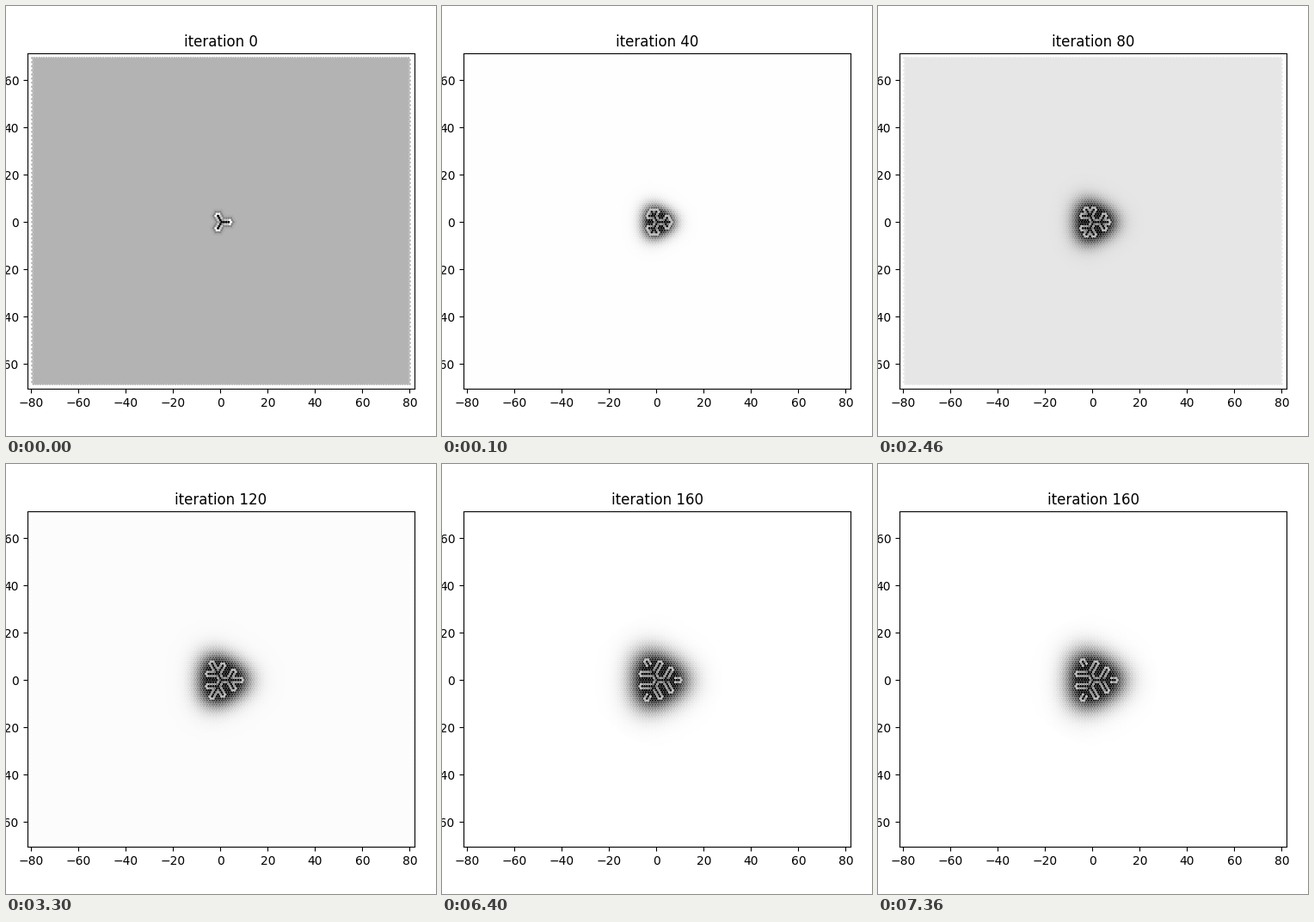
A matplotlib script that plays this animation: 500x500 px, repeating every 8 s.

```python
import numpy as np
import matplotlib.pyplot as plt
from matplotlib.animation import FuncAnimation
from matplotlib.patches import Rectangle

ROW = np.sqrt(3) / 2
CENTER = np.array([0.5, 0.0])

# start tick (100 ms each), iteration, background level, arm length,
# side branch length, arm steps without rim, depletion radius, depletion width
STAGES = [
    (0, 0, 0.700, 3, 0, (), 0, 0),
    (1, 40, 0.993, 5, 2, (), 4.0, 3.3),
    (12, 80, 0.900, 6, 3, (), 5.5, 4.2),
    (33, 120, 0.985, 8, 4, (), 6.5, 5.0),
    (64, 160, 0.997, 9, 5, (5, 6, 7), 7.0, 5.8),
]
BRANCH_AT = 3


def unit(degrees):
    a = np.radians(degrees)
    return np.array([np.cos(a), np.sin(a)])


def lattice():
    row, col = np.meshgrid(np.arange(-79, 81), np.arange(-79, 81), indexing="ij")
    x = col - 0.5 * (row % 2 == 0)
    return np.column_stack([x.ravel(), (row * ROW).ravel()])


def crystal(arm, side, bare):
    """Frozen cells and a mask of those that carry a visible rim."""
    cells, rimmed = [CENTER], [True]
    for angle in (0, 120, 240):
        for step in range(1, arm + 1):
            cells.append(CENTER + step * unit(angle))
            rimmed.append(step not in bare)
        root = CENTER + BRANCH_AT * unit(angle)
        for turn in (-60, 60):
            for step in range(1, side + 1):
                cells.append(root + step * unit(angle + turn))
                rimmed.append(True)
    return np.array(cells), np.array(rimmed)


def vapour(points, level, radius, width):
    dx, dy = (points - CENTER).T
    lobes = 1 - 0.07 * np.cos(3 * np.arctan2(dy, dx))
    depth = np.clip(np.hypot(dx, dy) * lobes - radius, 0, None) / width
    return level * (1 - np.exp(-depth ** 1.5))


def shade(points, stage):
    _, iteration, level, arm, side, bare, radius, width = stage
    cells, rimmed = crystal(arm, side, bare)
    dist = np.linalg.norm(points[:, None] - cells[None], axis=2)
    nearest = dist.min(axis=1)
    contacts = (dist[:, rimmed] < 1.1).sum(axis=1)
    if iteration == 0:
        value = np.full(len(points), level)
        value[nearest < 3.1] = 0.67
        value[nearest < 2.1] = 0.52
        rim = (1.0, 0.78, 0.62)
    else:
        value = vapour(points, level, radius, width)
        rim = (0.72, 0.58, 0.45)
    for count, gray in enumerate(rim, 1):
        value[contacts >= count] = gray
    value[nearest < 0.1] = 0
    return value


points = lattice()
low, high = points.min(axis=0), points.max(axis=0)
near = np.linalg.norm(points - CENTER, axis=1) < 27
border = ((points < low + 1.2) | (points > high - 1.2)).any(axis=1)
# The plain area between the border dots and the centre is one rectangle.
dots = points[near | border]
shades = [shade(dots, stage) for stage in STAGES]

fig = plt.figure(figsize=(5, 5), dpi=100)
ax = fig.add_axes([0.05, 0.11, 0.9, 0.78])
ax.set_xlim(low[0] - 2, high[0] + 2)
ax.set_ylim(low[1] - 2, high[1] + 2)
plate = ax.add_patch(Rectangle((low[0] + 0.5, low[1]), high[0] - low[0] - 1,
                               high[1] - low[1], lw=0, zorder=0.5))
scatter = ax.scatter(*dots.T, s=1, c=shades[0], cmap="gray", vmin=0, vmax=1)
title = ax.set_title("iteration 0")


def update(tick):
    index = max(i for i, stage in enumerate(STAGES) if stage[0] <= tick)
    _, iteration, level = STAGES[index][:3]
    plate.set_facecolor(plt.cm.gray(level))
    scatter.set_array(shades[index])
    title.set_text(f"iteration {iteration}")
    return plate, scatter, title


anim = FuncAnimation(fig, update, frames=80, interval=100, repeat=True,
                     repeat_delay=0, blit=False)
plt.show()
```
